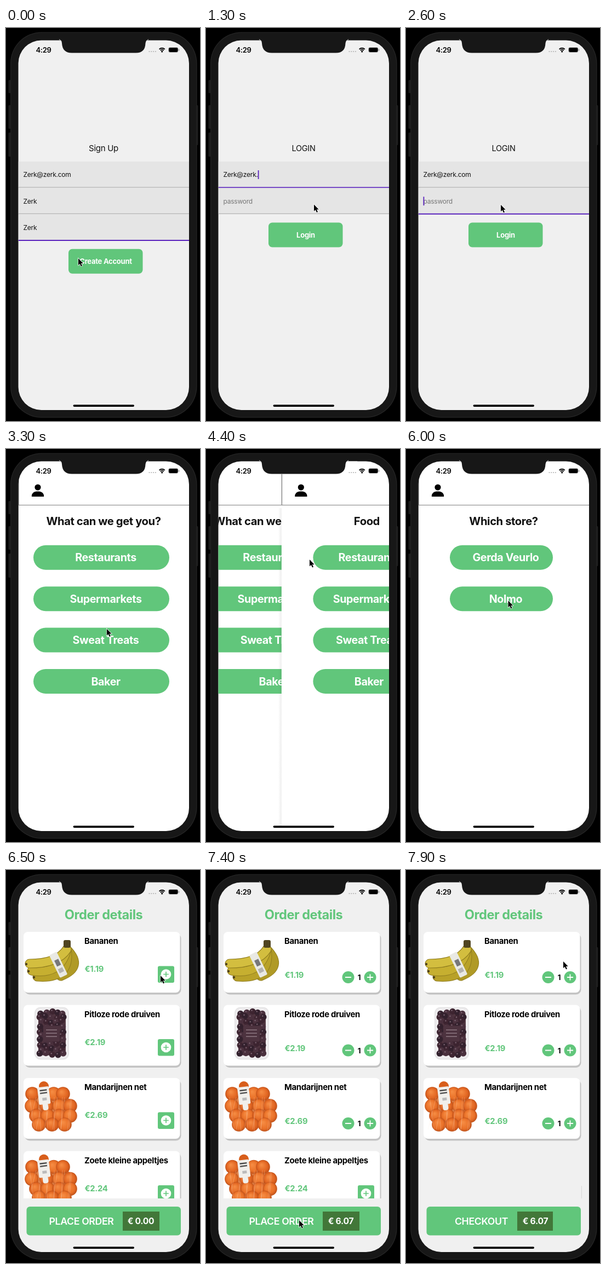
These frames come from a looping animation (354x718 px, 8 s). An HTML page with a canvas:

```html
<!DOCTYPE html>
<html lang="en">
<head>
<meta charset="utf-8">
<title>Grocery app</title>
<style>
html, body { margin: 0; width: 100%; height: 100%; overflow: hidden; background: #000; }
canvas { display: block; width: 354px; height: 718px; }
</style>
</head>
<body>
<canvas id="stage"></canvas>
<script>
const W = 354, H = 718, LOOP = 8000;
const GREEN = '#61c67b', PURPLE = '#5a22bd', GREY = '#f0f0f0';
const LEFT = 22.5, WIDTH = 311.5;
const canvas = document.getElementById('stage');
const dpr = window.devicePixelRatio || 1;
canvas.width = W * dpr;
canvas.height = H * dpr;
const c = canvas.getContext('2d');

// ---- drawing helpers ----
function rect(x, y, w, h, color, r = 0) {
  c.fillStyle = color;
  c.beginPath();
  c.roundRect(x, y, w, h, r);
  c.fill();
}
function disc(x, y, r, color) {
  c.fillStyle = color;
  c.beginPath();
  c.arc(x, y, r, 0, 7);
  c.fill();
}
function line(points, color, width = 1) {
  c.strokeStyle = color;
  c.lineWidth = width;
  c.beginPath();
  points.forEach(([x, y]) => c.lineTo(x, y));
  c.stroke();
}
function text(s, x, y, size, weight = 400, color = '#000', align = 'left') {
  c.font = `${weight} ${size}px Inter, "Open Sans", sans-serif`;
  c.letterSpacing = -size * 0.02 + 'px';
  c.fillStyle = color;
  c.textAlign = align;
  c.textBaseline = 'alphabetic';
  c.fillText(s, x, y + size * 0.36);
  return c.measureText(s).width;
}
const label = (s, x, y, size, weight, color) => text(s, x, y, size, weight, color, 'center');
function plus(x, y, r, color, width, minus) {
  line([[x - r, y], [x + r, y]], color, width);
  if (!minus) line([[x, y - r], [x, y + r]], color, width);
}
function at(x, y, paint) {
  c.save();
  c.translate(x, y);
  paint();
  c.restore();
}
function clip(x, y, w, h, r, paint) {
  c.save();
  c.beginPath();
  c.roundRect(x, y, w, h, r);
  c.clip();
  paint();
  c.restore();
}

// ---- forms ----
const EMAIL = 'Zerk@zerk.com', NAME = 'Zerk';

function field(i, value, hint, focused, caret) {
  const y = 244 + i * 48.3;
  rect(LEFT, y, WIDTH, 47, '#e5e5e5');
  rect(LEFT, y + 46.5, WIDTH, focused ? 2 : 1.2, focused ? PURPLE : '#b4b4b4');
  const w = text(value || hint, 31.5, y + 24, 12, 400, value ? '#111' : '#777');
  if (caret) rect(31.5 + (value ? w : 0), y + 16, 1.8, 16, PURPLE);
}
function button(s, y) {
  rect(114, y, 135.5, 45, GREEN, 7);
  label(s, 182, y + 22.5, 13, 700, '#fff');
}
function signUp() {
  rect(0, 0, W, H, GREY);
  label('Sign Up', 178, 220, 15, 400, '#111');
  field(0, EMAIL);
  field(1, NAME);
  field(2, NAME, '', true);
  button('Create Account', 403.8);
}
function login(t) {
  rect(0, 0, W, H, GREY);
  label('LOGIN', 178, 220, 14.5, 400, '#111');
  const inEmail = t > 600 && t < 2250, inPass = t >= 2250;
  const typed = Math.max(0, Math.floor((t - 690) / 66) + 1);
  const dots = Math.min(4, Math.max(0, Math.floor((t - 2640) / 75)));
  field(0, EMAIL.slice(0, typed), 'email', inEmail, inEmail);
  field(1, '•'.repeat(dots), 'password', inPass, inPass);
  button('Login', 355.5);
}

// ---- menus ----
const KINDS = ['Restaurants', 'Supermarkets', 'Sweat Treats', 'Baker'];

function menu(x, title, items, inset) {
  at(x, 0, () => {
    const g = c.createLinearGradient(LEFT - 6, 0, LEFT, 0);
    g.addColorStop(0, 'rgba(0,0,0,0)');
    g.addColorStop(1, 'rgba(0,0,0,.07)');
    rect(LEFT - 6, 108, 6, 582, g);
    rect(LEFT, 0, WIDTH + 1, H, '#fff');
    line([[LEFT + .5, 20], [LEFT + .5, 102.5]], '#555');
    line([[LEFT, 102.5], [LEFT + WIDTH, 102.5]], '#808080');
    disc(58, 70, 5.6, '#000');
    rect(46.8, 77.5, 22.4, 9.5, '#000', [10, 10, 1, 1]);
    label(title, 178, 132, 20.2, 700, '#111');
    items.forEach((s, i) => {
      const y = 175.8 + i * 75.4;
      rect(inset, y, 348 - 2 * inset, 45, GREEN, 22.5);
      label(s, 182, y + 22.5, 19.7, 700, '#fff');
    });
  });
}
const PAGES = [
  ['What can we get you?', KINDS, 50],
  ['Food', KINDS, 80],
  ['Which store?', ['Gerda Veurlo', 'Nolmo'], 80]
];
function slide(t, start) {
  const p = 1 - Math.exp(-3.3 * (t - start) / 1000);
  return t < start ? 0 : p > 0.966 ? 1 : p;
}
function menus(t) {
  const i = t < 4830 ? 0 : 1;
  const p = slide(t, i ? 4830 : 4100);
  if (p < 1) menu(-0.3 * WIDTH * p, ...PAGES[i]);
  if (p > 0) menu(WIDTH * (1 - p), ...PAGES[i + 1]);
}

// ---- products, drawn relative to the top of their card ----
function banana(cx, cy, x, y, color) {
  c.lineCap = 'round';
  [['#8f7c1e', 17], [color, 15]].forEach(([shade, width]) => {
    c.strokeStyle = shade;
    c.lineWidth = width;
    c.beginPath();
    c.moveTo(111, 32);
    c.quadraticCurveTo(cx, cy, x, y);
    c.stroke();
  });
  c.lineCap = 'butt';
  disc(x - 6, y + 1, 2.2, '#51431b');
}
function bananas() {
  banana(143, 64, 100, 81, '#b09a26');
  banana(119, 87, 57, 82, '#b8a128');
  banana(99, 80, 47, 71, '#c6af30');
  banana(94, 58, 43, 58, '#d3be3f');
  rect(105, 15, 13, 14, '#4f4420', 3);
  at(96, 60, () => {
    c.rotate(-0.45);
    rect(-8, -23, 15, 46, '#e9e9e4', 2);
    rect(-4, -10, 8, 12, '#77777a');
    rect(-5, 7, 9, 8, '#b5b4b2');
  });
}
function grapes() {
  rect(52, 4, 63, 96, '#e6e5e6', 11);
  rect(54, 6, 59, 92, '#efedef', 9);
  rect(59, 13, 50, 79, '#50353f', 8);
  for (let i = 0; i < 50; i++) {
    const row = Math.floor(i / 5), col = i % 5;
    const x = 63 + col * 10 + Math.sin(i * 7.1) * 2;
    const y = 14 + row * 8.4 + Math.cos(i * 4.7) * 2;
    disc(x, y, 5.8, ['#33212d', '#4a303d', '#3d2430'][i % 3]);
    disc(x - 1.5, y - 2, 1.3, '#77606d');
  }
  rect(68, 38, 30, 29, '#4d333f');
  [45, 51, 57].forEach(y => rect(73, y, 20, 1.5, '#8d7881'));
}
function oranges() {
  const rows = [[29, 48, 87, 104], [51, 47, 74, 97, 117], [69, 55, 76, 97, 117],
    [85, 60, 84, 107]];
  c.fillStyle = '#dc7d43';
  c.beginPath();
  c.ellipse(83, 58, 40, 34, 0, 0, 7);
  c.fill();
  disc(69, 15, 9, '#d85e1b');
  rows.forEach(([y, ...xs], j) => xs.forEach((x, k) => {
    const g = c.createRadialGradient(x - 3, y - 4, 1, x, y, 13.5);
    g.addColorStop(0, '#f58b42');
    g.addColorStop(.65, (j + k) % 2 ? '#ea7128' : '#e26622');
    g.addColorStop(1, '#b94d18');
    disc(x, y, 12.8, g);
  }));
  for (let i = 0; i < 6; i++) {
    line([[43 + i * 15, 35], [52 + i * 12, 97]], 'rgba(255,235,215,.35)', .7);
    line([[40 + i * 15, 94], [55 + i * 13, 35]], 'rgba(255,235,215,.35)', .7);
  }
  at(70, 35, () => {
    c.rotate(-0.12);
    rect(-11, -19, 21, 32, '#f1efeb', 2);
    rect(-5, 10, 10, 14, '#f1efeb', 4);
    rect(-7, -14, 13, 2.5, '#444');
    rect(-7, -9, 13, 2.5, '#555');
    rect(-4, 1, 8, 5, '#bbb');
  });
}

// ---- order ----
const GOODS = [
  { name: 'Bananen', price: 1.19, art: bananas, added: 6560 },
  { name: 'Pitloze rode druiven', price: 2.19, art: grapes, added: 6810 },
  { name: 'Mandarijnen net', price: 2.69, art: oranges, added: 7040 },
  { name: 'Zoete kleine appeltjes', price: 2.24, art: oranges, added: Infinity }
];
function card(item, i, t) {
  const inCart = t >= item.added;
  at(0, 113 + i * 133.5, () => {
    rect(34, 3, 285.5, 111.5, '#c3c3c3', 9);
    rect(32, 0, 285.5, 111, '#fff', 8);
    item.art();
    text(item.name, 143, 17, 14.8, 700);
    text('€' + item.price.toFixed(2), 143.5, inCart ? 79 : 68, 14.8, 700, GREEN);
    if (inCart) {
      disc(259.5, 83, 11, GREEN);
      disc(299.5, 83, 11, GREEN);
      plus(259.5, 83, 5.5, '#fff', 1.8, true);
      plus(299.5, 83, 5.5, '#fff', 1.8);
      label('1', 279.5, 83.5, 13.5, 700);
    } else {
      rect(277, 62.5, 30, 30.5, GREEN, 3);
      disc(292, 77.5, 9.3, '#fff');
      plus(292, 77.5, 4.8, GREEN, 1.7);
    }
  });
}
function order(t) {
  const checkout = t >= 7420;
  const total = GOODS.reduce((sum, g) => sum + (t >= g.added ? g.price : 0), 0);
  rect(0, 0, W, H, GREY);
  label('Order details', 178, 82, 23.6, 700, GREEN);
  clip(LEFT, 100, WIDTH, 500, 0, () =>
    GOODS.slice(0, checkout ? 3 : 4).forEach((g, i) => card(g, i, t)));
  if (checkout) rect(320, 577, .7, 23, '#ccc');
  rect(37.5, 615, 281.5, 52.5, GREEN, 6);
  label(checkout ? 'CHECKOUT' : 'PLACE ORDER', 137.5, 641.5, 17.7, 600, '#fff');
  const x = checkout ? 203 : 213;
  rect(x, 624, checkout ? 65 : 67, 35, '#427739');
  label('€ ' + total.toFixed(2), x + 33, 641.5, 15.7, 700, '#fff');
}

// ---- phone ----
function phone() {
  [[95, 24], [141, 43], [191, 44]].forEach(([y, h]) => rect(4.5, y, 5, h, '#1c1c1c', 1.5));
  rect(345, 141, 5.5, 73, '#1c1c1c', 1.5);
  rect(8, 7.5, 340.5, 704.5, '#242424', 57);
  rect(9.2, 8.7, 338, 702, '#171717', 56);
}
function statusBar() {
  c.fillStyle = '#171717';
  c.strokeStyle = '#fff';
  c.lineWidth = 1;
  c.beginPath();
  c.moveTo(97, 21);
  c.quadraticCurveTo(102, 22, 102, 28);
  c.quadraticCurveTo(103, 45.5, 120, 45.5);
  c.lineTo(237, 45.5);
  c.quadraticCurveTo(254, 45.5, 254.5, 28);
  c.quadraticCurveTo(255, 22, 260, 21);
  c.stroke();
  c.fill();
  label('4:29', 68.5, 40, 13, 600);
  for (let i = 0; i < 4; i++) disc(261.5 + i * 3.8, 43, 1.1, '#b5b5b5');
  c.strokeStyle = '#000';
  c.lineWidth = 1.9;
  [3.6, 6.6].forEach(r => {
    c.beginPath();
    c.arc(284.7, 44, r + .6, -2.36, -.78);
    c.stroke();
  });
  disc(284.7, 43, 1.6, '#000');
  rect(296.3, 35.3, 18, 9.4, '#aaa', 3);
  rect(297, 36, 16.6, 8, '#000', 2.4);
  rect(315, 38.2, 1.3, 3.6, '#999', 1);
}

// ---- pointer: [time, x, y] stops ----
const STOPS = [
  [0, 132, 421], [230, 132, 421], [520, 197, 268], [640, 197, 268], [900, 197, 322.5],
  [1800, 197, 322.5], [2150, 173, 323], [2900, 173, 323], [3080, 182, 374], [3200, 182, 374],
  [3500, 189, 202], [4480, 189, 202], [4760, 186.5, 277], [6080, 186.5, 277],
  [6420, 282, 193], [6600, 282, 193], [6760, 288, 322], [6850, 288, 322],
  [6990, 288, 454], [7090, 288, 454], [7280, 170, 640], [7420, 170, 640], [7880, 287, 167], [LOOP, 287, 167]
];
function pointer(t) {
  const i = STOPS.findIndex(s => s[0] > t);
  const [t0, x0, y0] = STOPS[i - 1], [t1, x1, y1] = STOPS[i];
  const u = (t - t0) / (t1 - t0), e = u * u * (3 - 2 * u);
  at(x0 + (x1 - x0) * e, y0 + (y1 - y0) * e, () => {
    const tip = new Path2D('M0 0V12.2L2.8 9.7L5 14.4L7 13.5L4.9 8.9H8.7Z');
    c.lineWidth = 1.4;
    c.strokeStyle = '#fff';
    c.stroke(tip);
    c.fillStyle = '#000';
    c.fill(tip);
  });
}

function draw(t) {
  c.setTransform(dpr, 0, 0, dpr, 0, 0);
  rect(0, 0, W, H, '#000');
  phone();
  const page = t < 260 ? signUp : t < 3240 ? login : t < 6050 ? menus : order;
  clip(LEFT, 22.5, WIDTH, 675.5, 42, () => page(t));
  statusBar();
  rect(122.5, 688.3, 111.5, 3.6, '#000', 2);
  pointer(t);
}
const begin = performance.now();
function tick() {
  draw((performance.now() - begin) % LOOP);
  requestAnimationFrame(tick);
}
tick();
</script>
</body>
</html>
```
